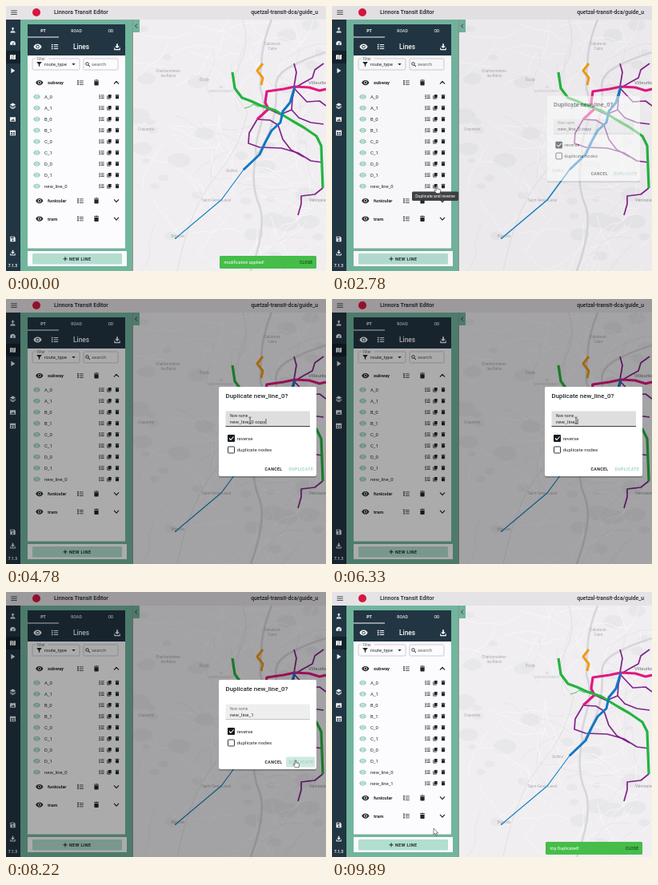
Animation, 400 px wide and 332 px high, one loop 10 s. Source, as an HTML page:

```html
<!DOCTYPE html>
<html lang="en">
<head>
<meta charset="utf-8">
<title>Network editor</title>
<style>
html, body { margin: 0; width: 100%; height: 100%; overflow: hidden; }
svg { display: block; width: 400px; height: 332px; font-family: Roboto, "Open Sans", sans-serif; }
</style>
</head>
<body>
<svg id="stage" viewBox="0 0 400 332"></svg>
<script>
const LOOP = 10000;
const NAVY = '#223543', MINT = '#71b59d', INK = '#20262b', PAPER = '#fcfbfd';
const stage = document.getElementById('stage');

// Markup helpers
const rect = (x, y, w, h, fill, extra = '') =>
  `<rect x="${x}" y="${y}" width="${w}" height="${h}" fill="${fill}" ${extra}/>`;
const line = (d, color, w, extra = '') =>
  `<path d="${d}" fill="none" stroke="${color}" stroke-width="${w}" stroke-linejoin="round" ${extra}/>`;
const text = (x, y, s, size, fill = INK, extra = '') =>
  `<text x="${x}" y="${y}" font-size="${size}" fill="${fill}" ${extra}>${s}</text>`;
const group = (id, body, extra = '') => `<g id="${id}" ${extra}>${body}</g>`;
const bold = 'font-weight="700" ', medium = 'font-weight="500" ', mid = 'text-anchor="middle" ';

// Icons on a 24-unit grid
const ICONS = {
  eye: 'M12 4.5C7 4.5 2.7 7.6 1 12c1.7 4.4 6 7.5 11 7.5s9.3-3.1 11-7.5C21.3 7.6 17 4.5 12 4.5ZM12 17a5 5 0 1 1 0-10 5 5 0 0 1 0 10Zm0-8a3 3 0 1 0 0 6 3 3 0 0 0 0-6Z',
  list: 'M2 4h4v4H2zM9 5h13v2.4H9zM2 10h4v4H2zM9 11h13v2.4H9zM2 16h4v4H2zM9 17h13v2.4H9z',
  trash: 'M5 7h14v12q0 2-2 2H7q-2 0-2-2zM4 3h5l1-1h4l1 1h5v2.5H4z',
  copy: 'M8 3h13v14H8zM3 7h3v12h12v3H3z',
  download: 'M10 3h4v7h5l-7 7-7-7h5zM3 15h2.5v4h13v-4H21v7H3z',
  upload: 'M12 2l6 6h-4v6h-4V8H6zM5 16h14l2 6H3z',
  gauge: 'M12 3a9.5 9.5 0 0 0-8 15q8-4 16 0A9.5 9.5 0 0 0 12 3Zm0 12a2 2 0 0 1-1-3l6-5-3 6.500a2 2 0 0 1-2 1.500Z',
  map: 'M2 5l6-2v16l-6 2zM9 3l6 2v16l-6-2zM16 5l6-2v16l-6 2z',
  play: 'M6 3l14 9-14 9z',
  layers: 'M12 2l10 6-10 6L2 8zM2 12l10 6 10-6v3l-10 6-10-6zM2 17l10 5 10-5v1l-10 6-10-6z',
  image: 'M2 4h20v16H2zM5 17h14l-5-7-4 5-2-2z',
  table: 'M2 3h20v18H2zM5 9v3h6V9zm8 0v3h6V9zm-8 5v4h6v-4zm8 0v4h6v-4z',
  save: 'M3 3h14l4 4v14H3zM6 5v5h9V5zm6 8a3 3 0 1 0 .1 0z',
  menu: 'M2 5h20v2.600H2zM2 11h20v2.600H2zM2 17h20v2.600H2z',
  filter: 'M2 3h20l-8 10v8l-4-2v-6z',
  down: 'M6 9h12l-6 6z'
};
const icon = (name, x, y, size, fill = INK) =>
  `<path transform="translate(${x - size / 2} ${y - size / 2}) scale(${size / 24})" d="${ICONS[name]}" fill="${fill}" fill-rule="evenodd"/>`;

function seeded(seed) {
  return () => (seed = (seed * 16807) % 2147483647) / 2147483647;
}

function mapBase() {
  const rnd = seeded(41);
  let out = rect(159, 17, 241, 315, '#f0eef1');
  for (let i = 0; i < 34; i++) {
    const x = 165 + rnd() * 230, y = 20 + rnd() * 300, r = 4 + rnd() * 11;
    out += `<ellipse cx="${x}" cy="${y}" rx="${r}" ry="${r * .65}" fill="#e8e7ea"/>`;
  }
  for (let i = 0; i < 105; i++) {
    let x = 159 + Math.sqrt(rnd()) * 241, y = 17 + rnd() * 315, a = rnd() * 6.3, d = `M${x} ${y}`;
    for (let k = 0; k < 5; k++) {
      a += (rnd() - .5) * 1.1;
      x += Math.cos(a) * 13; y += Math.sin(a) * 13;
      d += `L${x} ${y}`;
    }
    out += line(d, i % 4 ? '#f9f8fa' : '#e1e0e3', i % 4 ? .8 : .6);
  }
  out += line('M332 17Q322 42 320 62T318 104Q326 124 318 151T313 185Q305 222 316 248T306 332', '#d7d6da', 2.6);
  out += line('M400 58Q374 66 354 77T338 106Q338 136 329 158T313 187', '#d7d6da', 2.6);
  out += line('M296 17Q306 48 291 76T302 132Q294 176 262 214T214 332', '#e0dfe2', 1);
  const places = [
    [333, 49, 'Caluire-et-'], [333, 55, 'Cuire'], [203, 83, 'Charbonnières-'], [203, 89, 'les-Bains'],
    [248, 94, 'Écully'], [175, 156, 'Craponne'], [282, 208, 'Oullins'],
    [263, 245, 'Saint-Genis-Laval'], [215, 290, 'Brignais']
  ];
  for (const [x, y, s] of places) out += text(x, y, s, 4.7, '#aaa8ad', mid);
  out += text(269, 103, '5E', 3.6, '#c6c4c9', mid) + text(269, 108, 'ARRONDISSEMENT', 3.6, '#c6c4c9', mid);
  out += text(378, 98, 'Villeurbanne', 6, '#75747a') + text(379, 245, 'Vénissieux', 5.5, '#96949a');
  return out;
}

function transit() {
  const purple = [
    'M360 72L363 83L360 101', 'M397 72L386 80L383 90L372 96L362 102',
    'M314 142L304 159L303 172L317 177L344 178L365 184L381 194L396 196',
    'M314 142L330 143L340 149L346 167L356 180L372 189',
    'M326 128L343 136L357 130', 'M361 103L358 116L357 130L366 140L381 146L397 148',
    'M361 104L376 120L392 119L400 125',
    'M396 228L386 236L369 238L369 248L365 262'
  ];
  return purple.map(d => line(d, '#81238a', 1.7)).join('') +
    line('M298 128L305 126L309 123L315 126L325 124', '#35b94d', .9) +
    line('M321 72L314 81L321 90L319 99', '#f09c16', 3) +
    line('M400 104L392 106L379 102L361 101L347 104L326 107L324 121L328 129L314 142', '#e01880', 3.2) +
    line('M283 83L286 103L295 115L306 119L319 125L337 131L358 144L372 152L388 163L394 175L396 228', '#24b43e', 3.2) +
    line('M297 205L317 186L324 171L332 156L343 146L346 132L355 121L361 101', '#1177c4', 3) +
    `<path id="newLine" d="M212 291L269 243L297 205" fill="none" stroke="#1683c2"/>` +
    [[212, 291], [297, 205]].map(([x, y]) => `<circle cx="${x}" cy="${y}" r="1" fill="#1683c2"/>`).join('');
}

const chevron = (x, y, up) =>
  line(up ? `M${x - 3} ${y + 1.6}l3-3.200l3 3.200` : `M${x - 3} ${y - 1.6}l3 3.200l3-3.200`, INK, 1.2);

function groupRow(name, y, open) {
  return icon('eye', 41.8, y, 10) + text(52, y + 2, name, 5.9, INK, bold) +
    icon('list', 93, y, 9) + icon('trash', 113, y, 9) + chevron(138, y, open);
}

function lineRow(name, y) {
  return icon('eye', 38.5, y, 9.5, '#93cfbb') + text(48, y + 2, name, 5.9) +
    icon('list', 119.5, y, 7.5) + icon('copy', 129, y, 7) + icon('trash', 139, y, 7);
}

function panel() {
  const names = ['A_0', 'A_1', 'B_0', 'B_1', 'C_0', 'C_1', 'D_0', 'D_1', 'new_line_0'];
  const outline = 'rx="1.500" stroke="#b0aeb2" stroke-width=".6"';
  return rect(18, 17, 141, 315, MINT) + rect(157.8, 17, 1.2, 315, '#8f9696') + rect(159, 17, 8, 16, MINT) +
    line('M164 22.500l-2.500 2.500l2.500 2.500', NAVY, 1) +
    rect(27, 23, 122, 39, NAVY) + rect(27, 38.5, 39, 1, '#fff') +
    text(46.5, 33, 'PT', 5.2, '#fff', mid + bold) +
    text(88, 33, 'ROAD', 5.2, '#dfe5e8', mid + medium) +
    text(131, 33, 'OD', 5.2, '#dfe5e8', mid + medium) +
    icon('eye', 39.5, 51, 11, '#fff') + icon('list', 61, 51, 10, '#fff') +
    text(94, 54, 'Lines', 8.3, '#fff', mid + medium) + icon('download', 139, 51, 10, '#fff') +
    rect(27, 62, 122, 242, PAPER) +
    rect(33, 66, 59, 14, PAPER, outline) +
    rect(37, 64, 16, 4, PAPER) + text(38.5, 67.5, 'Filter', 4.5, '#666') +
    icon('filter', 41.5, 73, 8) + text(48, 75.2, 'route_type', 6) + icon('down', 84.5, 73, 9) +
    rect(97, 66, 43, 14, PAPER, outline) +
    `<circle cx="101.500" cy="72.500" r="1.800" fill="none" stroke="${INK}" stroke-width=".9"/>` +
    line('M102.800 73.800l2.200 2.200', INK, 1) + text(107, 75.2, 'search', 6, '#666') +
    groupRow('subway', 96, true) +
    names.map((n, i) => lineRow(n, 113.7 + 14 * i)).join('') +
    group('added', lineRow('new_line_1', 239.7)) +
    group('lower', groupRow('funicular', 244, false) + groupRow('tram', 266.5, false)) +
    rect(27, 303, 122, 1, '#cfd4d4') +
    rect(27, 307, 124, 19, PAPER) + rect(33, 310, 112, 13.5, '#b2decf', 'rx="1.500"') +
    line('M71.500 316.800h5M74 314.300v5', INK, 1) +
    text(79, 318.8, 'NEW LINE', 5.4, INK, bold + 'letter-spacing=".4"');
}

function shell() {
  const tools = [['upload', 30], ['gauge', 47], ['map', 64], ['play', 81], ['layers', 125],
    ['image', 142], ['table', 159], ['save', 292], ['download', 309]];
  return rect(0, 17, 18, 315, NAVY) + rect(0, 56, 18, 16, '#14212c') +
    tools.map(([n, y]) => icon(n, 8.5, y, 8.5, '#eef2f3')).join('') +
    text(8.5, 327, '7.1.3', 4.9, '#eef2f3', mid + bold) +
    rect(0, 0, 400, 17, '#e6e3e6') + icon('menu', 10, 8, 9) +
    '<circle cx="38" cy="8" r="5" fill="#d8173f"/>' +
    text(60, 10.4, 'Linnora Transit Editor', 7.1, INK, medium) +
    text(390, 10.4, 'quetzal-transit-dca/guide_u', 6.8, INK, 'text-anchor="end" ' + medium);
}

function dialog() {
  const caps = bold + 'letter-spacing=".4"';
  return rect(266, 111, 122, 113, '#000', 'rx="2" opacity=".2"') +
    rect(266, 110, 122, 112, '#fff', 'rx="2"') +
    text(274.5, 124, 'Duplicate new_line_0?', 7.9, INK, medium) +
    '<rect id="field" x="274.500" y="140.500" width="105.500" height="19.500"/><rect id="rule" x="274.500" width="105.500"/>' +
    text(280, 147.5, 'New name', 4.7, '#777', 'id="label"') +
    text(280, 155.8, '', 6.1, INK, 'id="value"') +
    '<rect id="caret" y="150" width=".7" height="7" fill="#222"/>' +
    rect(277, 170, 9, 9, '#161b1f', 'rx="1"') + line('M279 174.500l2 2l3.600-4', '#fff', 1.1) +
    text(288.5, 176.7, 'reverse', 6.2) +
    rect(277.5, 185, 8, 8, '#fff', 'rx=".8" stroke="#30363b"') +
    text(288.5, 191.2, 'duplicate nodes', 6.2) +
    rect(350, 206.5, 36, 13, '#cfe9df', 'id="press" rx="1.500"') +
    text(323.5, 214.8, 'CANCEL', 5.2, INK, caps) +
    text(353.5, 214.8, 'DUPLICATE', 5.2, '#9fd3c1', caps);
}

const cursors =
  group('arrow', `<path d="M0 0v8l1.900-1.700l1.300 3l1.300-.6l-1.300-2.800h2.500z" fill="#fff" stroke="#333" stroke-width=".6"/>`) +
  group('hand', `<path d="M-.8 0q.8-.8 1.600 0v3l3 .8q1 .4.8 1.600l-.7 3.400h-4.300l-2.800-3.600q.4-1.200 2.400.1z" fill="#fff" stroke="#222" stroke-width=".6"/>`) +
  group('beam', line('M-1.500-4q1.500 0 1.500 1v6q0 1-1.500 1M1.500-4q-1.500 0-1.500 1M0 3q0 1 1.500 1', '#222', .7));

stage.innerHTML = mapBase() + transit() + panel() + shell() +
  group('snack', rect(267, 313, 121, 16, '#45bd48', 'rx="1.500"') +
    text(272.5, 323.2, '', 5.4, '#fff', 'id="message"') +
    text(367, 323.2, 'CLOSE', 4.9, '#173d1b', medium + 'letter-spacing=".3"')) +
  rect(0, 0, 400, 332, '#000', 'id="scrim"') + group('dialog', dialog()) +
  group('tip', rect(100, 232.5, 58, 11.5, '#38393c', 'rx="1.500"') +
    text(129, 240.2, 'Duplicate and reverse', 5.2, '#fff', mid)) +
  group('cursor', cursors);

const el = {};
stage.querySelectorAll('[id]').forEach(n => el[n.id] = n);
const set = (id, attrs) => { for (const k in attrs) el[id].setAttribute(k, attrs[k]); };
const show = (id, on) => set(id, { opacity: +on });

const clamp = v => Math.max(0, Math.min(1, v));
const ramp = (t, a, b) => clamp((t - a) / (b - a));
const ease = v => v * v * (3 - 2 * v);
const last = (steps, t) => steps.filter(s => s[0] <= t).pop();

// Time, x, y
const PATH = [[670, 205, 262], [1330, 141, 205], [1780, 141, 205], [2300, 131, 226], [3550, 131, 226],
  [4450, 305, 152], [7550, 305, 152], [8100, 362, 211], [8750, 362, 211], [9750, 127, 296], [10000, 127, 296]];
const SHAPES = [[0, ''], [670, 'arrow'], [2150, 'hand'], [3650, 'arrow'], [4330, 'beam'],
  [7680, 'arrow'], [8000, 'hand'], [8560, 'arrow']];
const FULL = 'new_line_0 copy';
const TYPED = [[0, FULL], ...[5330, 5440, 5560, 5670, 5780, 6000].map((ms, i) => [ms, FULL.slice(0, 14 - i)]),
  [6800, 'new_line_1']];

function pointer(t) {
  const i = Math.max(0, PATH.findIndex(p => p[0] > t) - 1);
  const [a, x, y] = PATH[i], [b, u, v] = PATH[i + 1];
  const k = ease(ramp(t, a, b));
  return [x + (u - x) * k, y + (v - y) * k];
}

function render(t) {
  const shape = last(SHAPES, t)[1];
  for (const s of ['arrow', 'hand', 'beam']) show(s, s === shape);
  set('cursor', { transform: `translate(${pointer(t)})` });

  const done = t >= 8550;
  show('added', done);
  set('lower', { transform: `translate(0 ${done ? 14 : 0})` });
  set('newLine', { 'stroke-width': t > 2250 && t < 2890 ? 1.6 : 1.1 });

  const enter = ease(ramp(t, 8550, 8700));
  el.message.textContent = done ? 'trip Duplicated!' : 'modification applied!';
  show('snack', done ? enter : 1 - ramp(t, 110, 400));
  const grow = done ? .8 + .2 * enter : 1;
  set('snack', { transform: `translate(327.500 321) scale(${grow}) translate(-327.500 -321)` });

  set('tip', { opacity: .95 * ramp(t, 2350, 2480) * (1 - ramp(t, 2850, 3000)) });

  const leave = 1 - ease(ramp(t, 8330, 8540));
  const open = ease(ramp(t, 2665, 2890)) * leave;
  const scale = .9 + .1 * open;
  set('scrim', { opacity: .32 * ease(ramp(t, 2750, 2950)) * leave });
  set('dialog', { opacity: open, transform: `translate(327 166) scale(${scale}) translate(-327 -166)` });

  const focus = t >= 4560 && t < 8130;
  const value = last(TYPED, t);
  set('field', { fill: focus ? '#dedede' : '#eeeeee' });
  set('rule', { y: focus ? 159.2 : 159.5, height: focus ? .9 : .5, fill: focus ? '#222' : '#999' });
  set('label', { fill: focus ? '#333' : '#777' });
  el.value.textContent = value[1];
  set('caret', { x: 280.5 + el.value.getComputedTextLength() });
  show('caret', focus && (t - Math.max(4560, value[0])) % 1000 < 500);
  show('press', t >= 8000);
}

function tick() {
  render(performance.now() % LOOP);
  requestAnimationFrame(tick);
}
tick();
</script>
</body>
</html>
```
